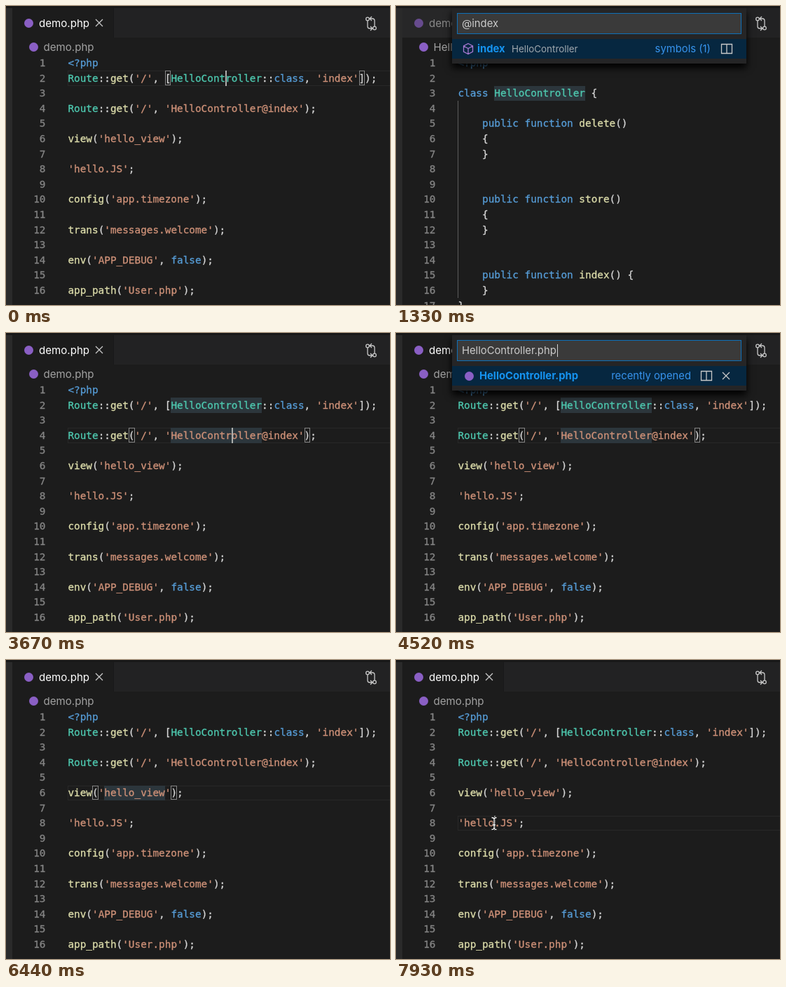
Animation of 548x426 px, one loop 8000 ms. Source, as an HTML page:

```html
<!DOCTYPE html>
<html lang="en">
<head>
<meta charset="utf-8">
<title>Go to definition</title>
<style>
  html, body { margin: 0; width: 100%; height: 100%; overflow: hidden; background: #1c1c1c; }
  #stage { position: relative; width: 548px; height: 426px; overflow: hidden; background: #1c1c1c;
    font: 15.1px/20px Inter, "Open Sans", sans-serif; color: #d4d4d4; }
  #stage div, svg, pre { position: absolute; margin: 0; white-space: pre; }
  .mono, pre { font: 14.37px/21.6px "DejaVu Sans Mono", monospace; -webkit-text-stroke: .3px; }
  #side { left: 0; top: 0; width: 9px; height: 426px; background: #2a2a2a; }
  #top { left: 0; top: 0; width: 548px; height: 3px; background: #181818; }
  #bar { left: 9px; top: 3px; width: 539px; height: 42px; background: #222223; }
  .tab { top: 3px; height: 42px; background: #1c1c1c; border-right: 1px solid #191919; box-sizing: border-box; }
  .tab.idle { background: #272728; }
  .tab span { position: absolute; left: 38px; top: 11.5px; color: #fff; }
  .tab.idle span { color: #8a8a8a; }
  .dot { width: 13px; height: 13px; border-radius: 50%; background: #8a5fc4; }
  .idle .dot { opacity: .65; }
  .crumb { left: 53.5px; top: 48.5px; color: #a2a2a2; }
  #nums { right: 491.5px; top: 71px; text-align: right; color: #858585; }
  pre { left: 88.4px; top: 71px; color: #d4d4d4; }
  .str { color: #ce9178; } .key { color: #569cd6; } .type { color: #4ec9b0; } .fn { color: #dcdcaa; }
  .line { left: 88px; width: 470px; height: 21.6px; box-sizing: border-box; border: 1px solid #282828; }
  .word { height: 21.6px; background: #2c363c; }
  .pair { width: 8.65px; height: 20.6px; box-sizing: border-box; border: 1px solid #858585; }
  .caret { width: 2px; height: 21.6px; background: #aeafad; }
  #guide { left: 88px; top: 135px; width: 1px; height: 281px; background: #5c5c5c; }
  .panel { left: 80px; top: 3px; width: 420px; height: 79px; background: #252526;
    box-shadow: 0 6px 10px #000; font-size: 14.8px; }
  .field { left: 7px; top: 7px; width: 406px; height: 30px; box-sizing: border-box;
    border: 1px solid #0e70b8; background: #3a3a3a; }
  .field span { position: absolute; left: 6px; top: 4px; color: #ccc; }
  .field i { position: absolute; left: 100%; top: 1px; width: 1px; height: 18px; margin-left: 1px; background: #d0d0d0; }
  .row { left: 0; top: 44px; width: 420px; height: 28px; background: #062740; }
  .row b, .row small, .row em { position: absolute; top: 4px; font-style: normal; }
  .row b { left: 39px; color: #1593f0; }
  .row small { left: 85px; color: #a0a8ae; font-size: 13.4px; }
  .row em { color: #3794ee; }
  svg { left: 0; top: 0; fill: none; stroke: #c8c8c8; stroke-width: 1.3; overflow: visible; }
</style>
</head>
<body>
<div id="stage"></div>
<script>
const LOOP = 8000, CELL = 8.65, LINE = 21.6, LEFT = 88.4, TOP = 70.5;
const stage = document.getElementById('stage');
const timed = [];

const demo = `<?php
Route::get('/', [HelloController::class, 'index']);

Route::get('/', 'HelloController@index');

view('hello_view');

'hello.JS';

config('app.timezone');

trans('messages.welcome');

env('APP_DEBUG', false);

app_path('User.php');`;

const controller = `<?php

class HelloController {

    public function delete()
    {
    }


    public function store()
    {
    }


    public function index() {
    }
}`;

function paint(code) {
  const tokens = /('[^']*')|(<\?php|\b(?:class|public|function|false)\b)|(\b[A-Z]\w+)|(\w+(?=\())/g;
  const kinds = ['str', 'key', 'type', 'fn'];
  return code.replace(tokens, (text, ...groups) => {
    const kind = kinds[groups.findIndex(Boolean)];
    return `<span class="${kind}">${text.replace('<', '&lt;')}</span>`;
  });
}

// spans: flat list of start and end times; none means always visible
function watch(el, spans) {
  if (spans) timed.push({ el, spans });
  return el;
}

function add(html, spans) {
  stage.insertAdjacentHTML('beforeend', html);
  return watch(stage.lastElementChild, spans);
}

const rowTop = row => TOP + (row - 1) * LINE;
const place = (row, col) => `left:${LEFT + col * CELL}px;top:${rowTop(row)}px`;
const line = (row, spans) => add(`<div class="line" style="top:${rowTop(row)}px"></div>`, spans);
const word = (row, col, size, spans) =>
  add(`<div class="word" style="${place(row, col)};width:${size * CELL}px"></div>`, spans);
const pair = (row, cols, spans) =>
  cols.forEach(col => add(`<div class="pair" style="${place(row, col)}"></div>`, spans));
const caret = (row, col, spans) => add(`<div class="caret" style="${place(row, col)}"></div>`, spans);
const dot = (x, y) => `<div class="dot" style="left:${x - 6.5}px;top:${y - 6.5}px"></div>`;
const icon = (path, extra = '') => `<svg width="1" height="1"><path d="${path}" ${extra}/></svg>`;
const cross = (x, y, r = 5) => icon(`M${x - r} ${y - r}l${2 * r} ${2 * r}m0 ${-2 * r}l${-2 * r} ${2 * r}`);
const split = x => icon(`M${x - 7.5} 7.5h15v13h-15zM${x} 7.5v13`);

function tab(x, width, name, idle, spans) {
  const close = idle ? '' : cross(width - 21, 21);
  add(`<div class="tab ${idle ? 'idle' : ''}" style="left:${x}px;width:${width}px">
    ${dot(23, 21)}<span>${name}</span>${close}</div>`, spans);
}

function panel(text, row, start, end) {
  const el = add(`<div class="panel"><div class="field"><span>${text}<i></i></span></div>
    <div class="row">${row}</div></div>`, [start, end]);
  const blink = [];
  for (let t = start; t < end; t += 1000) blink.push(t, Math.min(t + 500, end));
  watch(el.querySelector('i'), blink);
}

const fileRow = name => `${dot(24, 14)}<b>${name}</b>
  <em style="right:79px">recently opened</em>${split(363)}${cross(391, 14)}`;
const symbolRow = `${icon('M23 6.5l6.5 3.5v8l-6.5 3.5l-6.5-3.5v-8zM16.5 10l6.5 3.5l6.5-3.5M23 13.5v8', 'stroke="#a678d0"')}
  <b style="left:36px">index</b><small>HelloController</small>
  <em style="right:51px">symbols (1)</em>${split(392)}`;

const inDemo = [0, 630, 2300, LOOP], inClass = [630, 2300];

add('<div id="side"></div>');
add('<div id="top"></div>');
add('<div id="bar"></div>');
tab(9, 145, 'demo.php', false, inDemo);
tab(9, 145, 'demo.php', true, inClass);
tab(154, 211, '<i>HelloController.php</i>', false, inClass);
add(dot(39, 58));
add('<div class="crumb">demo.php</div>', inDemo);
add('<div class="crumb">HelloController.php</div>', inClass);
add(icon('M516 21v8q0 3 3 3h4m-3-3l3 3l-3 3M526 29v-8q0-3-3-3h-4m3-3l-3 3l3 3'));
add(`<svg width="1" height="1"><circle cx="516" cy="18.5" r="2.3"/><circle cx="526" cy="31.5" r="2.3"/></svg>`);

line(2, [0, 630, 2300, 3300]);
pair(2, [16, 48], [0, 630, 2300, 3300]);
line(4, [3300, 5750]);
word(2, 17, 15, [3550, 5750]);
word(4, 17, 15, [3550, 5750]);
pair(4, [10, 39], [3300, 5750]);
line(6, [5750, 7750]);
word(6, 6, 10, [6000, 7750]);
pair(6, [4, 17], [5750, 7750]);
line(8, [7750, LOOP]);
word(3, 6, 15, inClass);
add('<div id="guide"></div>', inClass);

const numbers = n => Array.from({ length: n }, (_, i) => i + 1).join('\n');
add(`<div id="nums" class="mono">${numbers(16)}</div>`, inDemo);
add(`<div id="nums" class="mono">${numbers(17)}</div>`, inClass);
add(`<pre>${paint(demo)}</pre>`, inDemo);
add(`<pre>${paint(controller)}</pre>`, inClass);

caret(2, 26, [0, 110, 2300, 2800]);
caret(4, 27, [3300, 3800, 5200, 5700]);
caret(6, 11, [5750, 6250]);
caret(8, 6, [7750, LOOP]);

panel('HelloController.php', fileRow('HelloController.php'), 330, 630);
panel('@index', symbolRow, 800, 1400);
panel('HelloController.php', fileRow('HelloController.php'), 4260, 5200);
panel('hello_view.blade.php', fileRow('hello_view.blade.php'), 6460, 7340);

const beam = 'M-3.5 -8.5q3.5 0 3.5 2.5v12q0 2.5 -3.5 2.5M3.5 -8.5q-3.5 0 -3.5 2.5v12q0 2.5 3.5 2.5M-2 2h4';
const mouse = add(`<svg width="1" height="1"><path d="${beam}" stroke="#111" stroke-width="3"/>
  <path d="${beam}" stroke="#fff"/></svg>`, [3110, 3300, 5250, 6000, 7400, LOOP]);

// time, x, y
const route = [[3110, 318, 138], [3300, 323, 146], [5250, 323, 146], [5600, 182, 190],
  [7400, 182, 190], [7750, 140, 233], [LOOP, 140, 233]];

function mouseAt(t) {
  const next = Math.max(1, route.findIndex(stop => stop[0] > t));
  const [t0, x0, y0] = route[next - 1], [t1, x1, y1] = route[next];
  const k = Math.min(1, Math.max(0, (t - t0) / (t1 - t0)));
  const ease = k * k * (3 - 2 * k);
  return [x0 + (x1 - x0) * ease, y0 + (y1 - y0) * ease];
}

const shown = (spans, t) => spans.some((start, i) => i % 2 === 0 && t >= start && t < spans[i + 1]);

function frame() {
  const t = performance.now() % LOOP;
  for (const { el, spans } of timed) el.style.display = shown(spans, t) ? '' : 'none';
  const [x, y] = mouseAt(t);
  mouse.style.transform = `translate(${x}px, ${y}px)`;
  requestAnimationFrame(frame);
}
frame();
</script>
</body>
</html>
```
